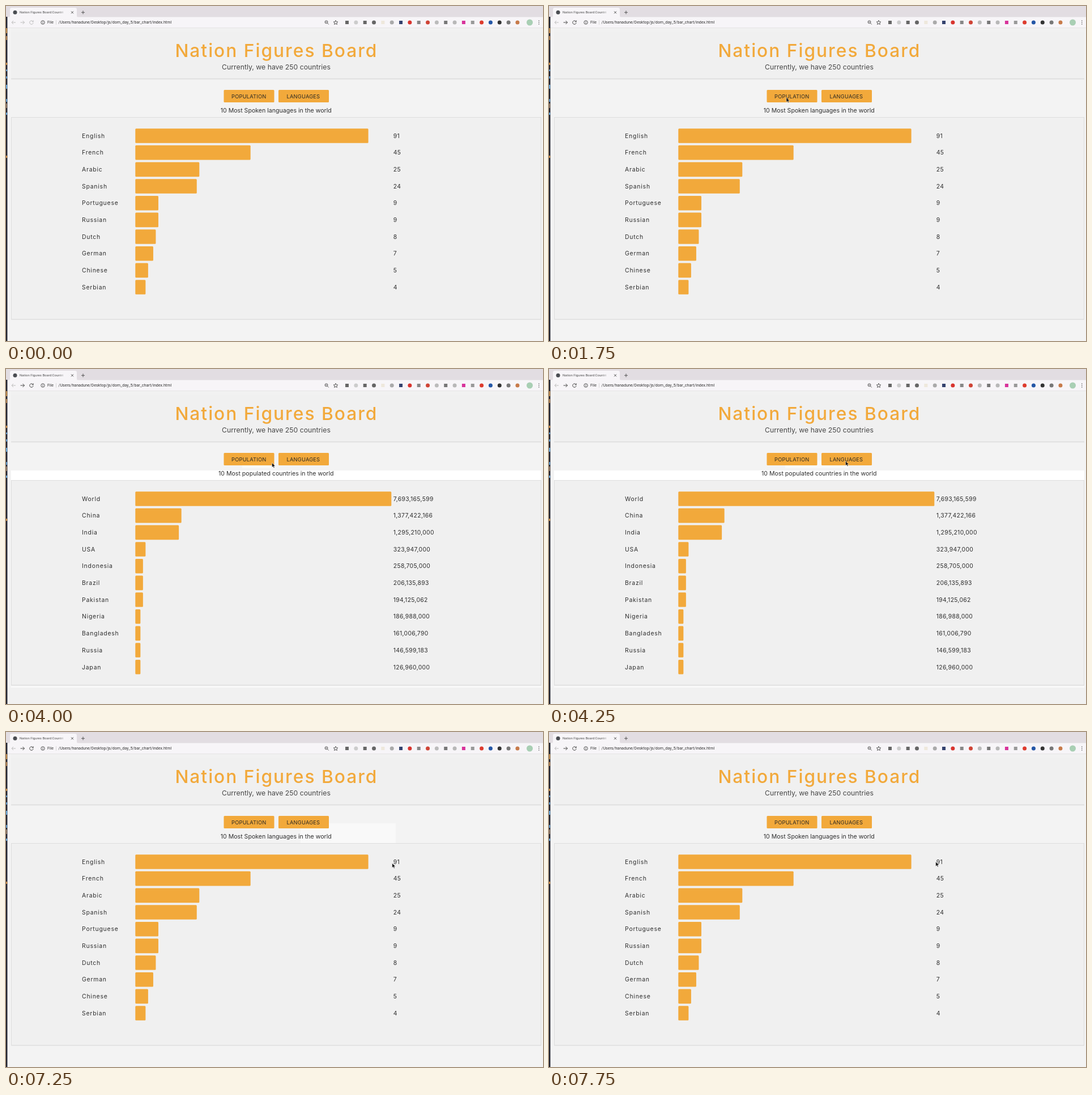
Write an HTML page that moves like this. It is 948 px wide and 591 px high and loops after 8000 ms.

```html
<!DOCTYPE html>
<html lang="en">
<head>
<meta charset="utf-8">
<title>Nation Figures Board</title>
<style>
  html, body { margin: 0; width: 100%; height: 100%; overflow: hidden; background: #f3f3f3; }
  svg { display: block; width: 948px; height: 591px; font-family: Inter, "Open Sans", sans-serif; }
  .ui { font-family: Roboto, sans-serif; fill: #333; }
  .mid { text-anchor: middle; }
  .row { font-size: 10.4px; fill: #2f2f2f; }
  .name { letter-spacing: .8px; }
  .value { letter-spacing: .3px; }
  .caption { font-size: 10.6px; fill: #2f2f2f; }
  .btn { font-size: 9.3px; letter-spacing: .2px; fill: #2d2a24; }
  .line { fill: none; stroke: #555; stroke-width: 1; }
</style>
</head>
<body>
<svg viewBox="0 0 948 591">
  <defs>
    <linearGradient id="fade">
      <stop offset="0" stop-color="#f7f5f8" stop-opacity="0"/>
      <stop offset="1" stop-color="#f7f5f8"/>
    </linearGradient>
  </defs>

  <!-- browser window -->
  <rect width="948" height="591" fill="#f3f3f3"/>
  <rect width="948" height="20" fill="#e2dde2"/>
  <path d="M4 20Q7 20 7 17V6Q7 3 10 3H122Q125 3 125 6V17Q125 20 128 20Z" fill="#f7f5f8"/>
  <rect y="19.5" width="948" height="18.5" fill="#f7f5f8"/>
  <rect y="38" width="948" height=".8" fill="#e3e1e3"/>
  <circle cx="16" cy="11.3" r="3.5" fill="#4a4d52"/>
  <text class="ui" x="24" y="13.4" font-size="6" fill-opacity=".85">Nation Figures Board:Countri</text>
  <rect x="92" y="6" width="18" height="11" fill="url(#fade)"/>
  <path class="line" d="M115 9.3l4 4m0-4l-4 4M133 11.3h6m-3-3v6"/>
  <path class="line" d="M17 29h-7m3-3l-3 3 3 3" style="stroke:#bbb"/>
  <g id="nav" class="line">
    <path d="M25.5 29h7m-3-3l3 3-3 3"/>
    <path d="M47.6 27.3a3.2 3.2 0 1 0 .5 2.3M48.2 25.4v2.4h-2.4"/>
  </g>
  <circle class="line" cx="65" cy="29" r="3.2"/>
  <path class="line" d="M65 28.6v2.2m0-3.9v.9"/>
  <text class="ui" x="73" y="31.4" font-size="6.9">File</text>
  <path d="M88.5 25v8" stroke="#ccc" stroke-width=".7"/>
  <text class="ui" x="92.5" y="31.4" font-size="7.1">/Users/hanadune/Desktop/js/dom_day_5/bar_chart/index.html</text>
  <circle class="line" cx="565.5" cy="28.3" r="2.5"/>
  <path class="line" d="M567.5 30.3l2.2 2.2M564.2 28.3h2.6"/>
  <path class="line" d="M582 25.3l1.1 2.5 2.7.2-2 1.8.6 2.7-2.4-1.4-2.4 1.4.6-2.7-2-1.8 2.7-.2z"/>
  <g id="icons"></g>
  <path d="M940.8 26v.01m0 2.99v.01m0 2.99v.01" stroke="#444" stroke-width="1.5" stroke-linecap="round"/>

  <!-- page -->
  <rect x="9" y="46" width="936" height="82" fill="#f0f0f0"/>
  <rect x="9" y="39" width="936" height="7" fill="#f1f1f1"/>
  <rect x="9" y="127.8" width="936" height="1.4" fill="#dcdcdc"/>
  <rect x="9" y="129.2" width="936" height="1" fill="#ebebeb"/>
  <text class="mid" x="477.4" y="90" font-size="31.7" font-weight="500" letter-spacing="2" fill="#f2a93b">Nation Figures Board</text>
  <text class="mid" x="477" y="112" font-size="12.25" fill="#484848">Currently, we have 250 countries</text>
  <rect id="band" x="9" y="179" width="936" height="17" fill="#fff"/>
  <rect id="patch" fill="#f9f9f9"/>
  <g fill="#f2a93b">
    <rect x="384.5" y="148" width="89" height="22" rx="1.5"/>
    <rect x="481" y="148" width="89" height="22" rx="1.5"/>
  </g>
  <text class="btn mid" x="428.8" y="162.8">POPULATION</text>
  <text class="btn mid" x="524.9" y="162.8">LANGUAGES</text>
  <g id="charts"></g>

  <!-- desktop edge -->
  <rect y="19" width="2.4" height="572" fill="#20222f"/>
  <g id="edge"></g>
  <path id="cursor" d="M0 0v8l1.9-1.7 1.3 2.8 1.4-.6-1.3-2.7h2.6z" fill="#111" stroke="#fff" stroke-width=".5"/>
</svg>
<script>
const LOOP = 8000;
const $ = id => document.getElementById(id);

function add(parent, tag, attrs, text = "") {
  const el = document.createElementNS("http://www.w3.org/2000/svg", tag);
  for (const key in attrs) el.setAttribute(key, attrs[key]);
  el.textContent = text;
  return parent.appendChild(el);
}

// Toolbar icons in an even row: round or square, colour
const icons = `s#666 c#ccc s#666 c#666 s#eee8dc c#aaa s#34426e c#d8342f s#888 c#cf4436 c#bbb
  s#777 c#b8b8b8 s#d8329b s#999 c#dd3b2e c#2456a6 c#333 c#777 c#c77a4a`.split(/\s+/);
icons.forEach((icon, i) => {
  const x = 602 + i * 15.84, fill = icon.slice(1);
  if (icon[0] === "c") add($("icons"), "circle", { cx: x, cy: 29, r: 3.5, fill });
  else add($("icons"), "rect", { x: x - 3, y: 26, width: 6, height: 6, fill });
});
add($("icons"), "circle", { cx: 924.5, cy: 29, r: 5.5, fill: "#a9cfb4" });

// Slivers of the window behind: top, height, colour
[[39, 9, "#b98549"], [53, 7, "#a97b4c"], [100, 4, "#c88a45"], [112, 3, "#5b93c4"], [124, 4, "#5b93c4"],
 [139, 7, "#66a5d8"], [164, 5, "#5b93c4"], [172, 8, "#87705f"], [188, 4, "#66a5d8"], [264, 4, "#c88a45"]]
  .forEach(([y, height, fill]) => add($("edge"), "rect", { y, width: 2.2, height, fill }));

function chart(caption, bottom, max, data) {
  const g = add($("charts"), "g", {});
  add(g, "rect", { x: 9.5, y: 196.5, width: 935, height: bottom - 196.5, fill: "#f0f0f0", stroke: "#dedede" });
  add(g, "rect", { x: 9, y: bottom + .5, width: 936, height: 1, fill: "#e9e9e9" });
  add(g, "text", { class: "mid caption", x: 476.7, y: 187.6 }, caption);
  Object.entries(data).forEach(([name, value], i) => {
    const y = 216.2 + i * 29.67;
    const width = Math.round(value / max * 100) * 4.52;
    add(g, "text", { class: "row name", x: 134, y: y + 16.6 }, name);
    add(g, "rect", { x: 228.3, y, width, height: 25.6, rx: 1.5, fill: "#f2a93b" });
    add(g, "text", { class: "row value", x: 683.8, y: y + 16.6 }, value.toLocaleString("en-US"));
  });
  return g;
}

const languages = chart("10 Most Spoken languages in the world", 552.5, 100, {
  English: 91, French: 45, Arabic: 25, Spanish: 24, Portuguese: 9,
  Russian: 9, Dutch: 8, German: 7, Chinese: 5, Serbian: 4
});
const population = chart("10 Most populated countries in the world", 557.5, 7693165599, {
  World: 7693165599, China: 1377422166, India: 1295210000, USA: 323947000,
  Indonesia: 258705000, Brazil: 206135893, Pakistan: 194125062, Nigeria: 186988000,
  Bangladesh: 161006790, Russia: 146599183, Japan: 126960000
});
add(population, "rect", { x: 9, y: 559.5, width: 936, height: 2.5, fill: "#fafafa" });
add(population, "rect", { x: 2.4, y: 562, width: 946, height: 29, fill: "#f1f1f1" });

// Pointer stops: time, x, y
const stops = [
  [0, -20, -20], [250, 404, 187.5], [500, 434.5, 201], [750, 417.5, 164], [1000, 418.7, 162.5],
  [1750, 419, 161.5], [4000, 469.5, 165.5], [4250, 523.5, 162.5],
  [7250, 681.7, 231.5], [7500, 682, 233.5], [7750, 682.7, 229]
];
// Brighter areas left by the pointer: start, end, x, y, width, height
const patches = [[4000, 4250, 417, 161, 58, 14], [4250, 5250, 417, 161, 112, 14], [7250, 7500, 520, 161, 168, 35]];

const show = (el, on) => el.setAttribute("visibility", on ? "visible" : "hidden");

function draw() {
  const t = performance.now() % LOOP;
  const people = t >= 2500 && t < 5250;
  show(population, people);
  show($("band"), people);
  show(languages, !people);
  $("nav").style.stroke = t < 250 ? "#bbb" : "#444";

  const [, x, y] = stops.findLast(stop => stop[0] <= t);
  $("cursor").setAttribute("transform", `translate(${x} ${y})`);

  const patch = patches.find(([from, to]) => t >= from && t < to);
  show($("patch"), patch);
  if (patch) ["x", "y", "width", "height"].forEach((key, i) => $("patch").setAttribute(key, patch[i + 2]));
  requestAnimationFrame(draw);
}
draw();
</script>
</body>
</html>
```
